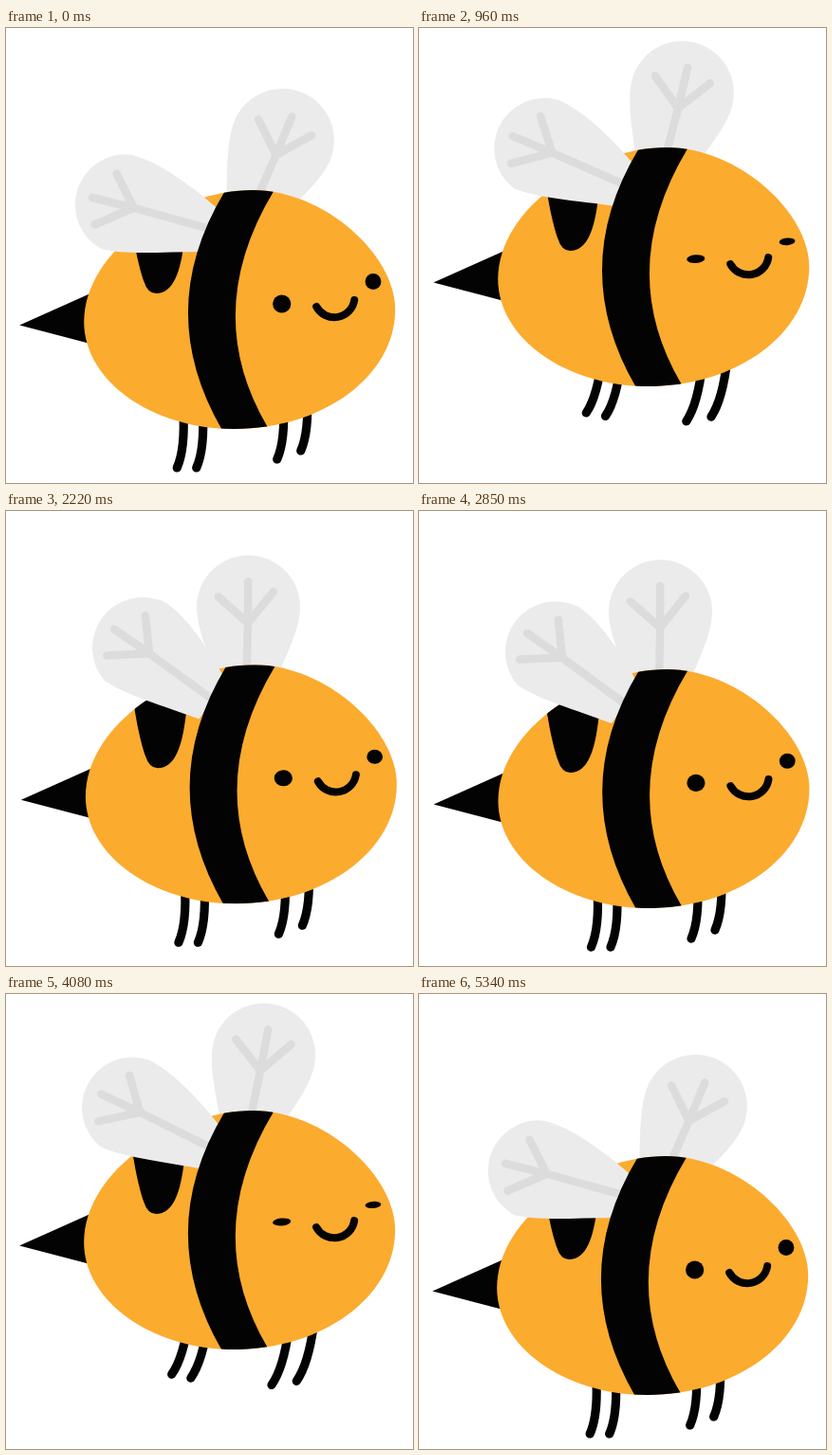
An HTML page that plays this animation: 429 by 480 pixels, repeating every 5.4 s.

```html
<!DOCTYPE html>
<html lang="en">
<head>
<meta charset="utf-8">
<title>Flying bee</title>
<style>
  html, body { margin: 0; width: 100%; height: 100%; overflow: hidden; background: #fff; }
  svg { display: block; width: 100%; height: 100%; fill: #030303; }
  .wing { fill: #ebebeb; }
  .vein, .line { fill: none; stroke-linecap: round; stroke-linejoin: round; }
  .vein { stroke: #dcdcdc; stroke-width: 8.5; }
  .line { stroke: #030303; stroke-width: 9.2; }
  .mouth { stroke-width: 8; }
</style>
</head>
<body>
<svg viewBox="0 0 429 480">
  <defs>
    <path id="shape" d="M82 310C82 234 180 171 260 171C335 171 410 239 410 297C410 367 334 423 240 423C153 423 82 372 82 310Z"/>
    <clipPath id="inside"><use href="#shape"/></clipPath>
    <path id="leg" class="line" d="M6.5-62Q9-20 0 0"/>
  </defs>
  <g id="bee">
    <g id="farWing">
      <path class="wing" d="M-30-22C-44-55-54.5-80-54.5-100A54.5 54.5 0 0 1 54.5-100C54.5-80 44-55 30-22Z"/>
      <path class="vein" d="M0-25V-83L-32-110M0-83L-1-127M0-83L26-117"/>
    </g>
    <g id="legs">
      <use href="#leg" x="180" y="464"/>
      <use href="#leg" x="200.5" y="464"/>
      <use href="#leg" x="285.5" y="455"/>
      <use href="#leg" x="310.5" y="446"/>
    </g>
    <path d="M14 313.5L100 275V336Z"/>
    <use href="#shape" fill="#fbab2e"/>
    <path clip-path="url(#inside)" d="M131 200C136 235 140 252 145 267Q149 280 158 280C176 280 184 258 188 222L190 180Z"/>
    <g id="nearWing">
      <path class="wing" d="M-12-24C-50-42-85-54-112-53.5A53.2 53.2 0 0 0-116 51C-88 50-52 36-12 25Z"/>
      <path class="vein" d="M-12 0H-95L-122-30M-95 0L-140 1M-95 0L-130 28"/>
    </g>
    <path clip-path="url(#inside)" d="M234 165L230 173Q155 298 227 423L229 430H281L275 420Q205 300 282 172L286 165Z"/>
    <ellipse id="leftEye" rx="9.6"/>
    <ellipse id="rightEye" rx="8.4"/>
    <path class="line mouth" d="M327 294A21.4 21.4 0 0 0 367 287"/>
  </g>
</svg>
<script>
const LOOP = 5400, END = 5340, STEP = 30, BOB = END / 2;

// Turning points of the flight as [time, height], and the wing beats done by a time.
const heights = [[0, 0], [1180, 49], [2620, 0], [3890, 50], [END, 0]];
const beats = [[0, 0], [1727, 5], [2850, 8.5], [3600, 10.5], [END, 15]];

const el = id => document.getElementById(id);
const place = (id, value) => el(id).setAttribute("transform", value);
const wave = turns => Math.cos(2 * Math.PI * turns);
const sineEase = u => (1 - wave(u / 2)) / 2;

function between(keys, t, ease = u => u) {
  const next = Math.max(1, keys.findIndex(([time]) => time >= t));
  const [t0, a] = keys[next - 1], [t1, b] = keys[next];
  return a + (b - a) * ease((t - t0) / (t1 - t0));
}

function setEye(id, x, y, radius, squint) {
  el(id).setAttribute("ry", radius * (1 - squint));
  place(id, `translate(${x} ${y}) rotate(${-8 * squint})`);
}

function draw(time) {
  const t = Math.min(Math.floor(time % LOOP / STEP) * STEP, END);
  const height = between(heights, t, sineEase);
  const drift = .9 + wave((t - 2000) / LOOP);
  const flap = 11.25 * (1 - wave(between(beats, t)));
  const swing = 12 * Math.max(0, wave((t - 1230) / BOB));
  const squint = height / 83;

  place("bee", `translate(${drift} ${-height})`);
  place("farWing", `translate(251 210) rotate(${23.7 - flap})`);
  place("nearWing", `translate(226 215) rotate(${15.4 + .93 * flap})`);
  place("legs", `rotate(${swing} 255 428)`);
  setEye("leftEye", 290.5, 291 - 4.5 * squint, 9.5, squint);
  setEye("rightEye", 386.8, 267.5 + 5 * squint, 8.4, squint);
}

const start = performance.now();
function tick() {
  draw(performance.now() - start);
  requestAnimationFrame(tick);
}
tick();
</script>
</body>
</html>
```
